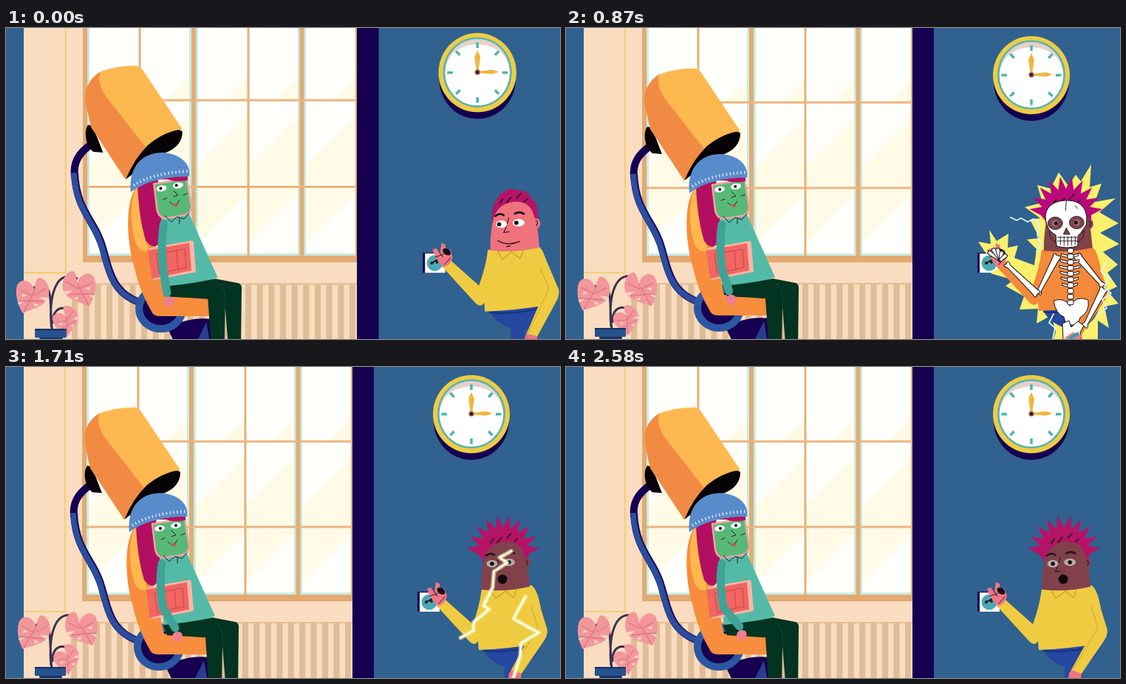
An HTML page that plays this animation: 750x422 px, repeating every 2.61 s.

```html
<!DOCTYPE html>
<html lang="en">
<head>
<meta charset="utf-8">
<title>Waiting room shock</title>
<style>
html, body { margin: 0; width: 100%; height: 100%; overflow: hidden; background: #30618f; }
svg { display: block; width: 100vw; height: 100vh; }
.ink { fill: none; stroke: #1a1020; stroke-width: 1.2; stroke-linecap: round; stroke-linejoin: round; }
.bone { fill: #fff; stroke: #171017; stroke-width: 1; stroke-linejoin: round; }
</style>
</head>
<body>
<svg viewBox="0 0 750 422" preserveAspectRatio="none">
<defs>
  <filter id="soft" x="0" y="-10" width="750" height="450" filterUnits="userSpaceOnUse"><feGaussianBlur stdDeviation=".7"/></filter>
  <path id="torso" d="M644 301Q676 306 711 296Q721 302 725 335L723 375Q685 382 640 384L639 372Q634 380 626 371L584 325L595 316L632 349Q641 325 644 301Z"/>
  <path id="sleeve" d="M706 298Q716 298 721 318L733 357Q733 365 728 372L698 416L684 411L711 362L706 330Z"/>
  <g id="leaf">
    <path d="M0 -3C-4 -18 -18 -21 -23 -11C-28 2 -23 19 -18 27C-9 22 9 22 17 9C22 -3 17 -18 6 -19Q1 -15 0 -3Z" fill="#f2979b"/>
    <path d="M0 -3L-17 25M-3 4L-20 -5M-7 11L-23 10M-2 4L15 -4M-7 11L10 13" stroke="#dd7484" stroke-width="1.3" fill="none"/>
    <path d="M-24 12l9 -1-8 4zM17 9l-12 -2 8 6zM-17 1l6 2-7 2zM4 18l-7-4 1 5z" fill="#fadcc1"/>
  </g>
</defs>
<rect width="750" height="422" fill="#30618f"/>
<g id="camera">
  <g filter="url(#soft)">
    <rect x="24" y="-10" width="446" height="450" fill="#fadcc1"/>
    <path d="M80 -10V332H24" fill="none" stroke="#f4cf72" stroke-width="2.2"/>
    <rect x="103" y="-10" width="367" height="328" fill="#e2aa71"/>
    <rect x="109" y="-10" width="358" height="319" fill="#c9ebe3"/>
    <g id="panes"></g>
    <g id="stripes" fill="#dfbd96"></g>
    <path d="M84 347H469" stroke="#e6bd92" stroke-width="2"/>

    <g id="plant">
      <path d="M62 408C58 385 64 353 51 350Q43 347 37 353M61 405C57 360 68 326 96 340M63 400C62 385 70 375 84 381" fill="none" stroke="#37334f" stroke-width="3"/>
      <use href="#leaf" id="leafA"/><use href="#leaf" id="leafB"/><use href="#leaf" id="leafC"/>
    </g>
    <path d="M45 418H76L74 440H47Z" fill="#163365"/>
    <rect x="39" y="407" width="42" height="12" rx="1" fill="#24528d"/>
    <path d="M39 408H81" stroke="#172e61" stroke-width="2"/>

    <!-- chair and dryer -->
    <path d="M216 406Q245 390 276 394L274 440H232Z" fill="#170052"/>
    <path d="M256 422L268 398L275 440H250Z" fill="#293d91"/>
    <path d="M117 158C96 172 90 185 92 203" fill="none" stroke="#150052" stroke-width="10"/>
    <path d="M92 198C94 250 120 262 130 300S146 360 180 372" fill="none" stroke="#17125e" stroke-width="10"/>
    <path d="M91 198C93 250 119 262 129 300S145 360 180 372" fill="none" stroke="#2c4d9f" stroke-width="7.5"/>
    <ellipse cx="207" cy="380" rx="29" ry="27" fill="#170052" stroke="#2c57a3" stroke-width="10"/>
    <path d="M176 216C160 232 160 283 171 322Q178 356 196 386Q199 390 206 390H272V362H214L199 290Z" fill="#f78d3d"/>
    <path d="M176 216C165 232 166 270 174 293Q180 305 190 303L195 225Z" fill="#ffb84e"/>
    <path d="M110 134C104 142 106 162 117 170L130 171L116 135Z" fill="#060306"/>
    <path d="M160 207L180 192L212 172Q236 163 236 143Q230 136 205 146Q170 163 160 207Z" fill="#060306"/>
    <path d="M107 106C103 88 112 72 126 63Q150 54 176 55L182 59L236 140Q213 142 190 161Q172 178 160 207L114 137Z" fill="#fdb850"/>
    <path d="M107 106C103 88 112 72 126 63Q122 78 134 96L187 164Q171 180 160 207L114 137Z" fill="#f18b44"/>

    <!-- seated visitor -->
    <path d="M176 216Q178 260 187 289Q194 300 203 295Q209 278 208 255L203 205Z" fill="#b30f60"/>
    <path d="M208 259L243 249L283 338Q247 353 214 352Q207 305 208 259Z" fill="#54baa8"/>
    <path d="M213 350Q247 347 280 340L311 346Q316 348 315 355L314 440H298L293 378L292 440H275L270 367L218 364Z" fill="#033321"/>
    <path d="M285 347Q295 352 293 378" fill="none" stroke="#174a36"/>
    <path d="M198 213L242 206L248 244Q247 253 238 255L213 259Q204 258 202 247Z" fill="#58b977" stroke="#eda5a0" stroke-width="2.5"/>
    <path d="M199 207L243 201V208Q226 211 217 207Z" fill="#b30f60"/>
    <path d="M167 224C164 193 179 172 208 171C235 172 248 188 245 203Q195 203 167 224Z" fill="#588bcb"/>
    <path d="M171 215Q197 198 244 196" fill="none" stroke="#d2e3f4" stroke-width="4" stroke-dasharray="1.5 3.4"/>
    <ellipse cx="208" cy="219" rx="7" ry="4" fill="#fff" transform="rotate(-8 208 219)"/>
    <ellipse cx="230" cy="215" rx="7" ry="4" fill="#fff" transform="rotate(-8 230 215)"/>
    <g id="gaze" fill="#151015"><circle cx="208" cy="219" r="2"/><circle cx="229" cy="215" r="2"/></g>
    <path class="ink" d="M224 222L230 228L224 230M219 237Q226 246 232 235M210 234l5-2M237 228l5-2M213 256l8 8 8-7 9 3 7-8M232 259v7" style="stroke-width:.9"/>
    <path d="M222 240L231 239L228 244Z" fill="#d74861"/>
    <path d="M191 299L248 289Q251 289 251 293L254 331L197 342Z" fill="#fbb6a6"/>
    <path d="M190 302L245 292L248 329L195 340Z" fill="#f16660"/>
    <path d="M201 307L239 300L241 325L205 333ZM228 302L230 328" fill="none" stroke="#c74450"/>
    <path id="arm" fill="none" stroke="#40a397" stroke-width="11" stroke-linecap="round" stroke-linejoin="round"/>
    <g id="palm" fill="#ee7e91"><ellipse rx="7" ry="6"/><path d="M-6 0L-4 9L0 6L3 8L6 0Z"/></g>
  </g>
  <rect x="469" y="-10" width="29" height="450" fill="#150050"/>

  <!-- clock -->
  <ellipse cx="630" cy="73" rx="51" ry="53" fill="#150050"/>
  <ellipse cx="630" cy="64" rx="52" ry="53" fill="#efcc45"/>
  <ellipse cx="630" cy="63.500" rx="46" ry="47" fill="#58b5ad"/>
  <ellipse cx="630" cy="63.500" rx="43.500" ry="44.500" fill="#e5d1cc"/>
  <path d="M587 64Q589 29 630 26Q671 29 673 64A43 44 0 0 1 587 64Z" fill="#fff"/>
  <g id="ticks" stroke="#4eb3ae" stroke-width="3.5"></g>
  <path d="M629 63L626 43L630 34L634 43L631 63ZM630 62.500L650 60L659 63L650 66L630 64.500Z" fill="#efb73e"/>
  <circle cx="630" cy="63.500" r="3.500" fill="#8b4c35"/><circle cx="630" cy="63.500" r="1.500" fill="#150050"/>

  <!-- switch -->
  <rect x="557" y="305" width="30" height="27" fill="#150050"/>
  <rect x="560" y="306" width="27" height="26" fill="#fff"/>
  <circle cx="573" cy="319" r="10.500" fill="#4ba9b4"/>
  <path d="M569 319L583 311" stroke="#171017" stroke-width="2"/><circle cx="569" cy="319" r="2" fill="#171017"/><circle cx="576" cy="318" r="1.800" fill="#171017"/>

  <path id="burst" fill="#faf06c" d="M573 274L583 289L599 279L598 298L612 295L607 312L634 322L637 300L624 287L641 285L628 260L642 258L621 243L645 237L638 213L656 218L667 196L680 214L690 199L697 208L711 185L709 216L725 211L716 236L744 231L722 250L748 265L723 278L749 293L727 304L747 321L733 332L746 351L733 357L748 374L729 378L735 407L720 397L720 440H655L663 412L657 390L637 401L639 381L614 382L620 364L595 350L606 342L575 333L590 322L568 305L558 290L575 293Z"/>

  <g id="man">
    <path d="M645 380Q650 397 675 407L675 440H692L694 409Q718 401 723 374Z" fill="#2647a0"/>
    <path d="M646 385Q680 389 723 377" fill="none" stroke="#18307c" stroke-width="2"/>
    <use href="#torso" class="top"/>
    <g id="rightArm">
      <path d="M685 409L698 415L695 440H677L681 416Z" fill="#ee737d"/>
      <use href="#sleeve" class="top"/>
      <path d="M711 325L720 354L686 411" fill="none" stroke="#a56d22" stroke-width=".8" opacity=".5"/>
    </g>
    <path d="M584 325L574 311L570 301L575 299L580 306L582 292L587 294L588 303L594 301L597 312L592 321Z" fill="#ee7783"/>
    <path class="ink" d="M574 311L585 307M579 304L584 311M586 321L594 312" style="stroke-width:.9"/>
    <ellipse cx="589" cy="304" rx="6" ry="4" fill="#171017" transform="rotate(35 589 304)"/>
    <g id="head">
      <path id="spikes"/>
      <path d="M646 268C643 241 653 229 661 224Q669 216 679 222Q693 221 697 231Q709 239 707 264Z" class="hair"/>
      <g class="skin">
        <ellipse cx="704" cy="266" rx="6" ry="7"/>
        <path d="M643 302Q643 275 648 257Q655 241 669 238Q692 233 700 251L706 270L709 298Q676 306 643 302Z"/>
      </g>
      <path class="ink" d="M704 262q4 1 1 7M668 258Q663 276 661 278L669 277" style="stroke-width:1"/>
      <path class="ink" d="M650 256Q656 251 661 255M676 253Q682 249 688 253" style="stroke-width:2.600"/>
      <path class="ink" d="M656 239l4-6M665 238l6-7M678 232l6-6M688 237l5-4" style="stroke-width:1.600"/>
      <ellipse cx="658" cy="267" rx="7.500" ry="5" class="eye"/><ellipse cx="681" cy="265" rx="8" ry="5" class="eye"/>
      <g id="pupils" fill="#171017"><circle cx="657" cy="267" r="2.800"/><circle cx="680" cy="265" r="2.800"/></g>
      <g id="lids" class="skin"><path d="M650 267Q651 260 658 260T666 267ZM672 265Q673 258 681 258T690 265Z"/><path class="ink" d="M650 267H666M672 265H690"/></g>
      <path id="smile" class="ink" d="M653 289Q667 297 682 290M665 297l5-1"/>
      <ellipse id="gasp" cx="672" cy="288" rx="6.500" ry="6.500" fill="#100a0d"/>
    </g>
    <path id="collar" class="ink" style="stroke:#c89d30" d="M657 303L663 314L676 304L687 313L692 301"/>
  </g>

  <g id="bones">
    <g id="limbs"></g>
    <path class="bone" d="M660 370Q675 365 682 377Q691 362 707 369Q709 386 696 393L692 403H677L674 392Q663 388 660 370Z"/>
    <path class="bone" d="M672 401l9-4 3 9 9-8 8 6-5 9 5 27H668l5-18Z"/>
    <path d="M674 421l12-8 13 4-4 8Z" fill="#e77b87"/><path d="M681 422l13-8" stroke="#2ca3ad" stroke-width="4"/>
    <g id="spine"></g>
    <g id="cranium">
      <path class="bone" d="M648 260C646 242 660 234 677 234C697 234 706 247 703 267L695 279L691 296Q677 300 663 296L661 281Q650 275 648 260Z"/>
      <g fill="#81404a" stroke="#171017" stroke-width=".8"><ellipse cx="661" cy="265" rx="10" ry="8.500"/><ellipse cx="690" cy="264" rx="10" ry="8.500"/><path d="M676 271L672 280H681ZM653 275L662 281L662 291Q653 287 653 275ZM700 275L692 281L691 291Q700 287 700 275Z"/></g>
      <g fill="#8f7472"><circle cx="661" cy="265" r="4.500"/><circle cx="690" cy="264" r="4.500"/></g>
      <g fill="#171017"><circle cx="662" cy="265" r="2.500"/><circle cx="689" cy="264" r="2.500"/></g>
      <path class="ink" d="M664 284H691M664 289H691M668 283v11M673 283v12M678 283v12M683 283v12M688 283v11M676 235l-1 13M688 241l3 4" style="stroke-width:.9"/>
    </g>
  </g>
  <g id="bolts" fill="none" stroke-linejoin="round" stroke-linecap="round">
    <path class="bolt" stroke="#fff7a0" stroke-width="6" opacity=".55"/>
    <path class="bolt" stroke="#fffdf2" stroke-width="2.600"/>
  </g>
  <path id="glints" fill="none" stroke="#fff8d8" stroke-width="2.500" stroke-linecap="round" d="M663 260L683 246M647 288l1 2M655 322l3 2M657 336l2 14M646 352l4-1M688 309l14 6M705 341l2 8M718 330v8M690 362l7-3M672 420l6-4M693 397l3-4"/>
  <path id="arcs" class="ink" style="stroke:#d8f4ff;stroke-width:1.800"/>
</g>
</svg>
<script>
const LOOP = 2610;
const $ = id => document.getElementById(id);
const all = q => [...document.querySelectorAll(q)];
const clamp = x => Math.max(0, Math.min(1, x));
const smooth = x => (x = clamp(x), x * x * (3 - 2 * x));
const mix = (a, b, k) => a + (b - a) * k;
const show = (id, on) => $(id).style.display = on ? '' : 'none';
const paint = (q, color) => all(q).forEach(e => e.setAttribute('fill', color));
const move = (id, x, y, r = 0, sx = 1, sy = 1) =>
  $(id).setAttribute('transform', `translate(${x} ${y}) rotate(${r}) scale(${sx} ${sy})`);

// Repeated scenery
function build() {
  let s = '';
  for (const [x, r] of [[112, 178], [180, 245], [257, 323], [325, 390], [401, 467]]) {
    for (const [y, b] of [[-10, 100], [102, 216], [218, 306]])
      s += `<path fill="#fffffc" d="M${x} ${y}H${r}V${b}H${x}Z"/>`;
    s += `<path fill="#fffbe7" d="M${r} 70V100H${r - 30}ZM${r} 122V216H${x}V188ZM${x} 218H${r}V226L${x} 292Z"/>`;
  }
  for (const x of [251, 395.5]) s += `<path d="M${x} -10V309" stroke="#dfad77" stroke-width="6"/>`;
  for (const x of [179, 324]) s += `<path d="M${x} -10V309" stroke="#e5b279" stroke-width="3"/>`;
  for (const y of [101, 217]) s += `<path d="M109 ${y}H468" stroke="#e9b681" stroke-width="3"/>`;
  $('panes').innerHTML = s;

  s = '';
  for (let x = 88.2; x < 469; x += 15.45) s += `<rect x="${x}" y="348" width="${Math.min(8, 469 - x)}" height="90"/>`;
  $('stripes').innerHTML = s;

  s = '';
  for (let i = 0; i < 8; i++) s += `<path d="M630 23.500V31" transform="rotate(${i * 45} 630 64)"/>`;
  $('ticks').innerHTML = s;

  const limb = (x, y, x2, y2, w = 7) => {
    const len = Math.hypot(x2 - x, y2 - y), a = Math.atan2(y2 - y, x2 - x) * 180 / Math.PI;
    return `<path class="bone" transform="translate(${x} ${y}) rotate(${a})" d="M0 0Q-4 ${-w} 4 ${-w * .65}L${len - 5} -2.500Q${len + 3} ${-w} ${len} 0Q${len + 3} ${w} ${len - 5} 2.500L4 ${w * .65}Q-4 ${w} 0 0Z"/>`;
  };
  s = limb(665, 309, 639, 360) + limb(638, 361, 596, 320) + limb(692, 309, 727, 350) + limb(728, 354, 702, 405);
  for (let i = 0; i < 5; i++) s += limb(588, 315, 572 + i * 6, 304 - Math.sin(i) * 5, 3);
  $('limbs').innerHTML = s;

  s = '';
  for (let i = 0; i < 6; i++) {
    const w = 14 - Math.abs(i - 2) * 1.2, y = 306 + i * 8;
    s += `<path class="bone" d="M${682 - w} ${y}Q682 ${y + 5} ${682 + w} ${y}v3Q682 ${y + 8} ${682 - w} ${y + 3}Z"/>`;
  }
  for (let i = 0; i < 10; i++) s += `<rect class="bone" x="679" y="${299 + i * 7.8}" width="8" height="6.500" rx="2"/>`;
  $('spine').innerHTML = s;

  s = '';
  for (let i = 0; i < 21; i++) {
    const a = (180 + i * 9) * Math.PI / 180, r = i % 2 ? 50 : 34;
    s += `${i ? 'L' : 'M'}${673 + Math.cos(a) * r} ${254 + Math.sin(a) * r * 1.06}`;
  }
  $('spikes').setAttribute('d', s + 'L704 265H648Z');
}

const tracks = [
  [[681, 248], [666, 258], [676, 264], [661, 276], [658, 299], [648, 322], [653, 330], [635, 348], [630, 357], [616, 366]],
  [[702, 313], [695, 329], [687, 340], [704, 352], [718, 358], [700, 377], [699, 394], [689, 421]]
];
const noise = n => { const x = Math.sin(n * 127.1) * 43758.5453; return x - Math.floor(x) - .5; };
function bolt(step) {
  return tracks.map((pts, k) => pts.map(([x, y], i) => {
    const n = step * 31 + k * 17 + i;
    return `${i ? 'L' : 'M'}${x + noise(n) * 6} ${y + noise(n + .5) * 5}`;
  }).join('')).join('');
}

const phases = [[0, 'calm'], [600, 'bolt'], [750, 'bones'], [1080, 'glint'], [1380, 'bolt'], [1890, 'bones'], [2220, 'stun']];

function draw(t) {
  const mode = phases.filter(p => p[0] <= t).pop()[1];
  const calm = mode === 'calm', bones = mode === 'bones';
  const settle = 1 - Math.pow(1 - clamp(t / 360), 3);
  const zoom = mix(1.0137, 1, settle);
  $('camera').setAttribute('transform', `translate(24 320) scale(${zoom}) translate(-24 -320)`);

  const lean = smooth(t / 1260);
  move('leafA', mix(39, 41, lean), mix(358, 356, lean), mix(-5, 0, lean));
  move('leafB', mix(95, 99, lean), mix(349, 351, lean), mix(4, 0, lean), -1);
  move('leafC', mix(82, 84, lean), 392, -35, .78, .78);

  const k = smooth(t / LOOP * .9 + .05), x = mix(218, 238, k), y = mix(370, 363, k);
  $('arm').setAttribute('d', `M211 267Q207 290 ${mix(210, 213, k)} 326L${x - 3} ${y - 11}`);
  move('palm', x, y, -k * 25);
  move('gaze', mix(-1, 1, smooth(t / 1500)), 0);

  const shake = 2.5 - 2.5 * Math.cos((t - 1710) / 180 * 2 * Math.PI);
  move('head', calm ? mix(4, 0, settle) : shake, 0);
  move('cranium', bones ? shake - 2.5 : 0, 0);
  $('rightArm').setAttribute('transform', `rotate(${mix(-6, 0, settle)} 714 300)`);

  paint('.skin', calm ? '#f0727c' : '#80414a');
  paint('.top', bones ? '#f3893a' : '#eecb41');
  paint('.hair, #spikes', bones ? '#b8087a' : '#b61366');
  paint('.eye', calm ? '#fff' : '#b9aaa8');
  move('pupils', calm ? -2 : 1, 0);
  show('spikes', !calm);
  show('gasp', !calm);
  show('smile', calm);
  show('lids', calm && t > 240 && t < 480);
  show('burst', bones);
  show('bones', bones);
  show('collar', !bones);
  show('bolts', mode === 'bolt');
  show('glints', mode === 'glint');
  show('arcs', bones);

  const step = Math.floor(t / 60);
  if (mode === 'bolt') all('.bolt').forEach(e => e.setAttribute('d', bolt(step)));
  if (bones) {
    const j = noise(step) * 8;
    $('arcs').setAttribute('d', `M${600 + j} 257l8 4 6-3 9 5 8-4 8 7-3 15 5 12-6 10M${730 + j} 318l-8 12 10 8-5 14 9 8-12 8 6 12-11 9M${662 - j} 388l-6 12 8 7-3 15`);
  }
}

build();
const start = performance.now();
function tick() {
  draw((performance.now() - start) % LOOP);
  requestAnimationFrame(tick);
}
draw(0);
requestAnimationFrame(tick);
</script>
</body>
</html>
```
